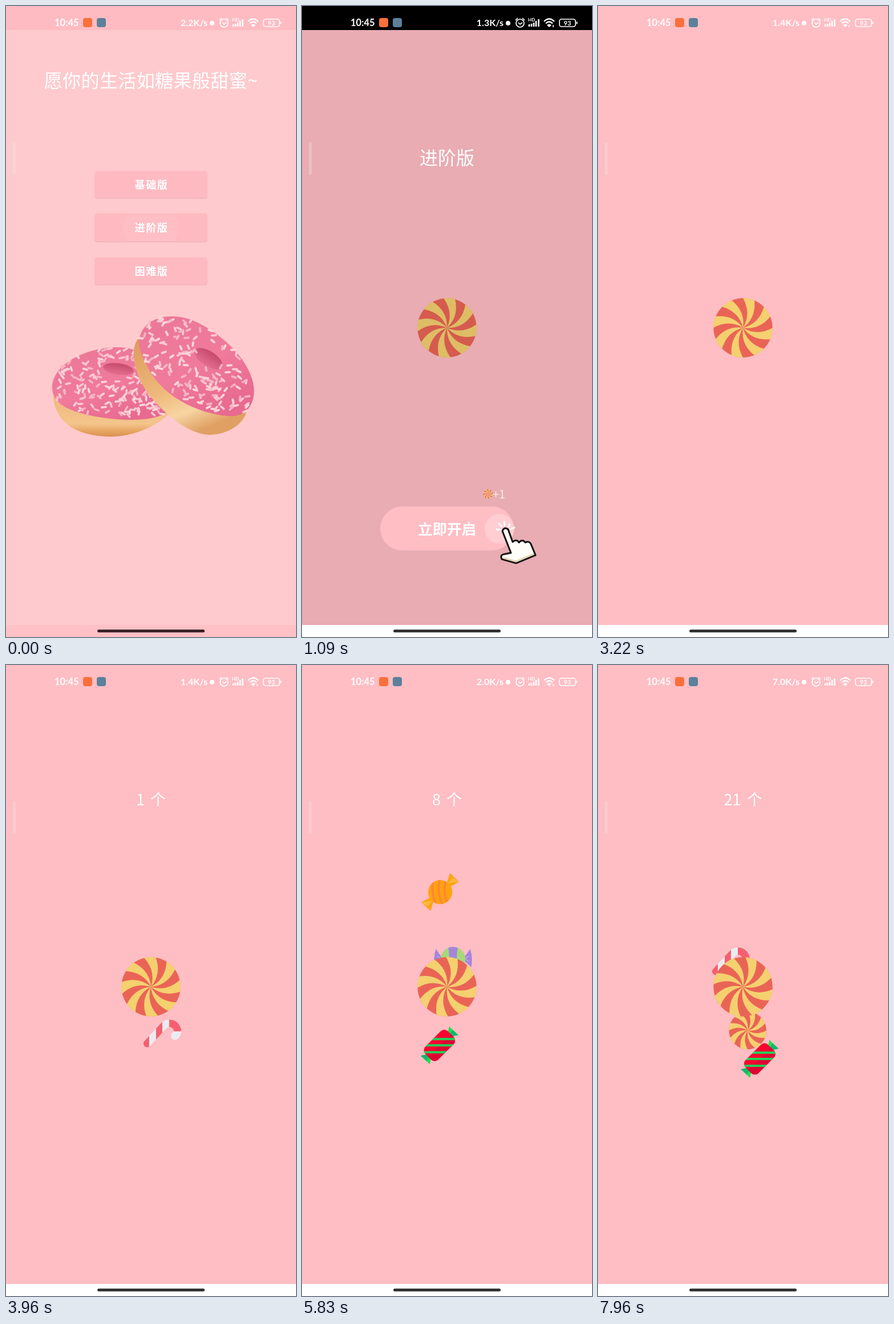
An HTML page that plays this animation: 508x1102 px, repeating every 8000 ms.

```html
<!DOCTYPE html>
<html lang="zh-CN">
<head>
<meta charset="utf-8">
<title>糖果</title>
<style>
html, body { margin: 0; width: 100%; height: 100%; overflow: hidden; background: #ffbdc4; }
svg { display: block; width: 100vw; height: 100vh; }
text { font-family: "Noto Sans CJK SC", "Noto Sans CJK", "Noto Sans", sans-serif; fill: #fff; }
.mid { text-anchor: middle; }
.lat { font-family: Lato, sans-serif; font-weight: 700; }
</style>
</head>
<body>
<svg viewBox="0 0 508 1102" preserveAspectRatio="none">
  <defs>
    <linearGradient id="dough" x1="0" y1="0" x2="0" y2="1">
      <stop offset=".5" stop-color="#f0bd83"/>
      <stop offset=".78" stop-color="#f3c58c"/>
      <stop offset=".9" stop-color="#e8a763"/>
      <stop offset="1" stop-color="#d98f52"/>
    </linearGradient>
    <linearGradient id="dough2" x1="0" y1="0" x2=".5" y2="1">
      <stop offset="0" stop-color="#dc9a5c"/>
      <stop offset=".55" stop-color="#efb87b"/>
      <stop offset=".8" stop-color="#f7d5a2"/>
      <stop offset="1" stop-color="#e0a063"/>
    </linearGradient>
    <linearGradient id="icing" x1="0" y1="0" x2=".6" y2="1">
      <stop offset="0" stop-color="#eb7897"/>
      <stop offset=".6" stop-color="#f07a9b"/>
      <stop offset="1" stop-color="#e86a90"/>
    </linearGradient>
    <linearGradient id="hole" x1="0" y1="0" x2="0" y2="1">
      <stop offset="0" stop-color="#c64a6b"/>
      <stop offset="1" stop-color="#e46e90"/>
    </linearGradient>
    <clipPath id="tap"><rect x="156" y="362" width="196" height="49" rx="4"/></clipPath>
    <clipPath id="caneRed"><path d="M-40-40h17v80h-17zM-11-40h11v80h-11zM12-40h30v36h-30z"/></clipPath>
    <clipPath id="roll"><rect x="-28" y="-16" width="56" height="32" rx="9" transform="rotate(-45)"/></clipPath>
    <clipPath id="c21"><circle r="21"/></clipPath>
    <clipPath id="c17"><circle r="17.5"/></clipPath>
    <clipPath id="c21b"><circle cy="2" r="21.5"/></clipPath>

    <g id="swirl"></g>
    <g id="mint"><use href="#swirl" transform="scale(.635)"/></g>
    <g id="cane" fill="none" stroke-width="13">
      <g stroke="#ebecf0">
        <path id="hook" d="M-26.500 17.500L2.600-13.900A14 14 0 0 1 26.500-4" stroke-linecap="round"/>
        <path d="M26-4Q26 2 22 4" stroke-width="14" stroke-linecap="round"/>
      </g>
      <use href="#hook" stroke="#f4606f" clip-path="url(#caneRed)"/>
    </g>
    <g id="green">
      <g id="tailG"><path d="M17-33L33-18 13-14z" fill="#1fdf4c"/><path d="M33-18L13-14 23-27z" fill="#0cba6c"/></g>
      <use href="#tailG" transform="rotate(180)"/>
      <g clip-path="url(#roll)">
        <path d="M-40-40h80v80h-80z" fill="#f7052f"/>
        <path d="M40-40L-40 40h80z" fill="#dd0531"/>
        <path d="M-40-11h80M-40 0h80M-40 12h80" stroke="#23cf58" stroke-width="4"/>
      </g>
    </g>
    <g id="orange">
      <g id="tailO"><path d="M11-14L17-33 33-18 17-9z" fill="#ffa30d"/><path d="M13-15L33-18 22-25z" fill="#ffb73e"/></g>
      <use href="#tailO" transform="rotate(180)"/>
      <circle r="21" fill="#ffa30d"/>
      <path d="M-11-24Q-18 0-6 24M0-24Q-7 0 5 24M11-24Q3 0 14 20" fill="none" stroke="#ff8638" stroke-width="4" clip-path="url(#c21)"/>
    </g>
    <g id="gem">
      <path d="M10-14L18-34 22-29 24-31 26-26 29-26 28-22 33-21 14-9z" fill="#d93b3d"/>
      <path d="M-9 13L-29 13-31 19-32 28-25 33-13 32-10 24z" fill="#d93b3d"/>
      <g clip-path="url(#c17)">
        <circle r="17.5" fill="#fdd71a"/>
        <path d="M-22-18Q-6-14 6-8 15 4 22 8V-30H-12zM22 20Q4 14-4 8-13-4-22-8V30H12z" fill="#d93b3d"/>
        <path d="M-18-9Q-10-16-2-13L13 2Q16 10 9 18L-6 11-13 4z" fill="#fdd71a"/>
      </g>
      <circle r="5.8" fill="#40a9ee"/>
    </g>
    <g id="purple">
      <g id="tailP"><path d="M18 0Q24-6 30-16 35 0 32 16 25 9 18 4z" fill="#a585dc"/><path d="M21 1l7-4M21 2l7 4" stroke="#c2a8ee" stroke-width="1.5"/></g>
      <use href="#tailP" transform="scale(-1 1)"/>
      <g clip-path="url(#c21b)">
        <path d="M-24-22h48v48h-48z" fill="#a6d977"/>
        <path d="M-9-22H9Q4 2 9 26H-9Q-4 2-9-22z" fill="#a585dc"/>
      </g>
    </g>
  </defs>

  <g id="home">
    <rect width="508" height="1102" fill="#ffcacd"/>
    <rect width="508" height="42" fill="#ffbbc2"/>
    <rect y="1081" width="508" height="21" fill="#ffc0c6"/>
    <text class="mid" x="254" y="142" font-size="32" letter-spacing=".4">愿你的生活如糖果般甜蜜~</text>
    <g id="menu"></g>
    <circle id="ripple" cx="254" cy="388" fill="#fff" clip-path="url(#tap)"/>
    <path d="M82 668C80 725 120 752 185 752 235 751 280 724 296 700L270 650z" fill="url(#dough)"/>
    <path id="ice1" d="M81 662C86 622 146 594 200 596 252 598 296 650 285 704 276 724 215 726 170 719 118 711 78 698 81 662Z" fill="url(#icing)"/>
    <ellipse cx="197" cy="634" rx="27" ry="10" fill="url(#hole)" transform="rotate(8 197 634)"/>
    <g id="spr1" stroke-linecap="round" stroke-width="3.6"></g>
    <path d="M232 580C216 600 224 640 248 676 280 716 320 747 355 749 390 749 418 728 421 708L300 600z" fill="url(#dough2)"/>
    <path id="ice2" d="M236 573C248 540 298 532 340 555 398 585 440 640 434 680 430 706 414 718 388 716 340 712 274 684 248 630 234 604 229 590 236 573Z" fill="url(#icing)"/>
    <ellipse cx="355" cy="616" rx="28" ry="13" fill="url(#hole)" transform="rotate(33 355 616)"/>
    <g id="spr2" stroke-linecap="round" stroke-width="3.8"></g>
  </g>

  <g id="page">
    <rect width="508" height="1102" fill="#ffbdc4"/>
    <g id="sweets"></g>
    <use id="disc" href="#swirl"/>
    <text id="count" class="mid" x="254" y="245" font-size="27" word-spacing="4"></text>
    <rect y="1081" width="508" height="21" fill="#fff"/>
    <g id="dialog">
      <rect y="42" width="508" height="1039" opacity=".09"/>
      <rect width="508" height="42"/>
      <text class="mid" x="254" y="277" font-size="32">进阶版</text>
      <rect x="137" y="874" width="234" height="77" rx="38.5" fill="#ffbdc4"/>
      <text class="mid" x="254" y="923" font-size="25.5" font-weight="700">立即开启</text>
      <g id="plus">
        <use href="#swirl" transform="translate(326 852) scale(.165)"/>
        <text x="334" y="860" font-size="20">+1</text>
      </g>
      <circle id="halo" cx="346" cy="913" fill="#fff"/>
      <path id="rays" d="M341 914l7 1M345 904l5 5M354 901l1 6M364 905l-2 4M366 913l6-2" stroke="#fff" stroke-width="3" stroke-linecap="round"/>
      <g id="hand" stroke-linejoin="round">
        <path d="M351 917Q354 909 361 914L369 936Q376 930 380 937 386 930 391 937 399 933 402 942L409 959 375 973 350 966Q346 958 356 957L366 955Z" fill="#fffdf8" stroke="#111" stroke-width="3"/>
        <path d="M353 964L375 970 406 957" fill="none" stroke="#e6d6b8" stroke-width="3"/>
      </g>
    </g>
  </g>

  <rect x="12" y="238" width="5" height="57" rx="2.5" fill="#ece2e2" opacity=".38"/>
  <rect id="bar" x="160" y="1089" width="188" height="5" rx="2.5"/>

  <g fill="none" stroke="#fff" stroke-width="1.7">
    <text class="lat" x="85" y="35" font-size="16.5" stroke="none">10:45</text>
    <rect x="135" y="21" width="16" height="16" rx="4" fill="#f9703a" stroke="none"/>
    <rect x="159" y="21" width="16" height="16" rx="4" fill="#5d819a" stroke="none"/>
    <text id="rate" class="lat" x="353" y="35" font-size="16" stroke="none" text-anchor="end"></text>
    <circle cx="361" cy="30" r="4" fill="#fff" stroke="none"/>
    <circle cx="382" cy="30" r="7"/>
    <path d="M379 29l3 3 4-3M374 25l4-4M390 25l-4-4"/>
    <text class="lat" x="396" y="27" font-size="8" stroke="none">HD</text>
    <path d="M398 36v-4M402 36v-5M406 36v-7M410 36v-10M414.500 36v-13" stroke-width="2.6"/>
    <path d="M424 27Q433 18 442 27M427 30.500Q433 24.500 439 30.500" stroke-width="2.2"/>
    <path d="M429 33.500Q433 29.500 437 33.500L433 37z" fill="#fff" stroke="none"/>
    <path id="net" d="M440 33v4" stroke-width="2"/>
    <rect x="451" y="23" width="28" height="13" rx="3.500"/>
    <path d="M481.500 27.500v4" stroke-width="2"/>
    <text class="lat mid" x="465" y="33.500" font-size="11" stroke="none">93</text>
  </g>
</svg>
<script>
const LOOP = 8000, LIFE = 900, CX = 254, CY = 562;
const SPIN = -360 / 20000, SPIN_ZERO = 3220;
const $ = id => document.getElementById(id);
const clamp = v => Math.max(0, Math.min(1, v));
const span = (t, a, b) => clamp((t - a) / (b - a));
const easeOut = u => 1 - (1 - u) ** 3;

function add(parent, tag, attrs) {
  const el = document.createElementNS('http://www.w3.org/2000/svg', tag);
  for (const k in attrs) el.setAttribute(k, attrs[k]);
  parent.appendChild(el);
  return el;
}
const set = (id, attrs) => { for (const k in attrs) $(id).setAttribute(k, attrs[k]); };

// striped disc: eight curved yellow blades on red
function polar(r, deg) {
  const a = deg * Math.PI / 180;
  return (r * Math.sin(a)).toFixed(2) + ' ' + (-r * Math.cos(a)).toFixed(2);
}
let blades = '';
for (let a = 0; a < 360; a += 45) {
  const b = a + 22.5;
  blades += `M0 0Q${polar(29, a + 31)} ${polar(52, a)}A52 52 0 0 1 ${polar(52, b)}Q${polar(29, b + 31)} 0 0Z`;
}
add($('swirl'), 'circle', { r: 51.7, fill: '#ea6456' });
add($('swirl'), 'path', { d: blades, fill: '#f4d06f' });

[['基础版', 288, 47], ['进阶版', 362, 49], ['困难版', 439, 47]].forEach(([label, y, h]) => {
  const box = { x: 156, width: 196, height: h, rx: 4 };
  add($('menu'), 'rect', { ...box, x: 155.5, y: y + 1.5, width: 197, fill: '#e9a9b0', opacity: .7 });
  add($('menu'), 'rect', { ...box, y, fill: '#ffbac1' });
  add($('menu'), 'text', { class: 'mid', x: 255, y: y + h / 2 + 7, 'font-size': 18, 'font-weight': 700, 'letter-spacing': 1.6 })
    .textContent = label;
});

let seed = 7;
const rnd = () => (seed = seed * 16807 % 2147483647) / 2147483647;
function sprinkle(group, icing, x, y, w, h, hx, hy, n) {
  const svg = document.querySelector('svg');
  while (n) {
    const p = svg.createSVGPoint();
    p.x = x + rnd() * w;
    p.y = y + rnd() * h;
    if (!icing.isPointInFill(p) || Math.hypot((p.x - hx) / 30, (p.y - hy) / 18) < 1) continue;
    const a = rnd() * Math.PI, dx = 3.6 * Math.cos(a), dy = 3 * Math.sin(a);
    add(group, 'path', {
      d: `M${p.x - dx} ${p.y - dy}l${2 * dx} ${2 * dy}`,
      stroke: ['#fdc9d2', '#f8b4c3', '#fed6da'][n % 3]
    });
    n--;
  }
}
sprinkle($('spr1'), $('ice1'), 84, 598, 200, 120, 197, 634, 165);
sprinkle($('spr2'), $('ice2'), 234, 544, 196, 168, 355, 616, 150);

// kind, launch time, travel from the centre
const sweets = [
  ['cane', 3827, 133, 549], ['gem', 4040, 65, -114], ['cane', 4220, -289, -234],
  ['mint', 4800, -150, 40], ['green', 5000, -14, 8], ['orange', 5200, -17, -236],
  ['green', 5482, -34, 264], ['purple', 5600, 41, -196], ['orange', 5920, 60, 115],
  ['gem', 6020, -30, -120], ['purple', 6130, 65, 60], ['cane', 6230, -61, 127],
  ['green', 6450, 20, 15], ['gem', 6600, 31, -143], ['mint', 6780, 0, -114],
  ['orange', 7050, -159, -20], ['mint', 7500, 16, 149], ['green', 7230, 36, 155],
  ['purple', 7370, -20, 18], ['cane', 7650, -61, -128], ['orange', 7820, 30, -30]
].map(([kind, start, dx, dy]) => ({ start, dx, dy, el: add($('sweets'), 'use', { href: '#' + kind }) }));

function draw(t) {
  const slide = easeOut(span(t, 250, 680));
  set('page', { transform: `translate(${508 * (1 - slide)} 0)`, display: slide ? 'inline' : 'none' });
  set('home', { transform: `translate(${-130 * slide} 0)`, display: slide < 1 ? 'inline' : 'none' });
  set('ripple', { r: 48 + t * .3, opacity: .05 * (1 - span(t, 0, 300)) });
  set('bar', { fill: slide > .5 ? '#333' : '#3a2328' });

  set('disc', { transform: `translate(${CX} ${CY}) rotate(${SPIN * (t - SPIN_ZERO)})` });

  const fade = 1 - span(t, 2600, 2850);
  set('dialog', { opacity: fade, display: fade ? 'inline' : 'none' });
  const phase = (t - 1090) / 1000;
  const press = .5 + .5 * Math.cos(2 * Math.PI * phase);
  set('hand', { transform: `translate(${14 * (1 - press)} ${3 * (1 - press)})` });
  set('rays', { opacity: span(press, .5, .9) });
  set('halo', { r: 18 + 8 * press, opacity: .25 * press });
  const rise = (phase + 2.25) % 1;
  set('plus', { transform: `translate(0 ${10 - 40 * rise})`, opacity: .75 * span(rise, 0, .12) * (1 - span(rise, .4, .8)) });

  let count = 0;
  for (const s of sweets) {
    const u = (t - s.start) / LIFE;
    if (u >= 0) count++;
    s.el.setAttribute('display', u >= 0 && u < 1 ? 'inline' : 'none');
    s.el.setAttribute('transform', `translate(${CX + s.dx * u} ${CY + s.dy * u})`);
  }
  $('count').textContent = count ? count + ' 个' : '';
  $('rate').textContent = (t < 300 ? '2.2' : t < 2200 ? '1.3' : t < 4300 ? '1.4' : t < 6200 ? '2.0' : '7.0') + 'K/s';
  set('net', { opacity: t > 300 && t < 6200 ? .8 : 0 });
}

const begin = performance.now();
function tick() {
  draw((performance.now() - begin) % LOOP);
  requestAnimationFrame(tick);
}
tick();
</script>
</body>
</html>
```
